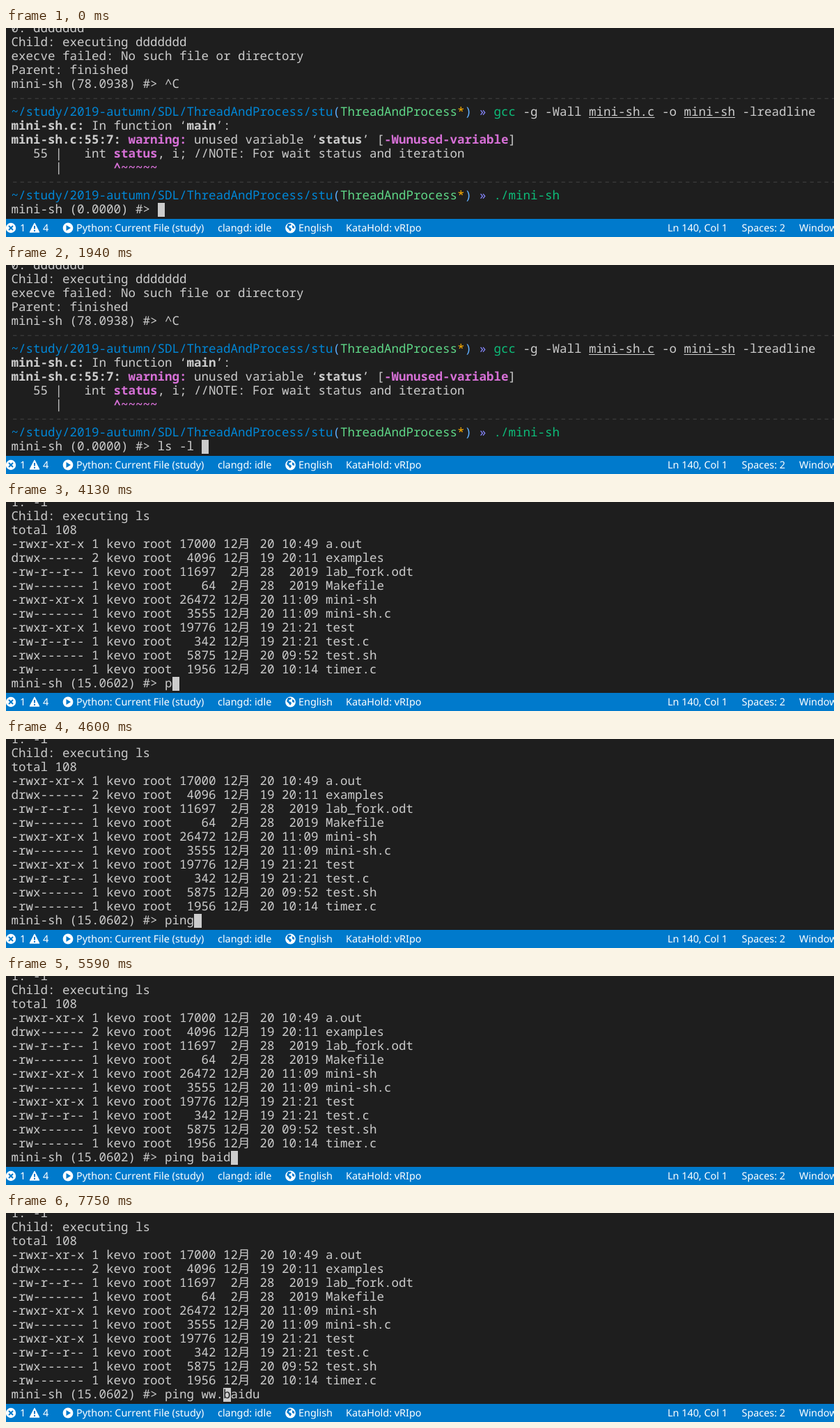
These frames come from a looping animation (1189x300 px, 8 s). An HTML page:

```html
<!DOCTYPE html>
<html lang="zh-CN">
<head>
<meta charset="utf-8">
<title>mini-sh</title>
<style>
  html, body { margin: 0; width: 100%; height: 100%; overflow: hidden; background: #1e1e1e; }
  body { position: relative; text-rendering: geometricPrecision; }
  pre, #cursor {
    position: absolute; margin: 0; white-space: pre;
    font: 17.5px/20px "Noto Sans Mono", "Noto Sans CJK SC", "Noto Sans CJK JP", monospace;
    font-variant-ligatures: none;
  }
  pre { left: 7.5px; top: -10px; color: #ccc; }
  #cursor { top: 251px; height: 20px; line-height: 18px; background: #ccc; color: #1e1e1e; overflow: hidden; }
  i { display: inline-block; width: 21px; font-style: normal; }
  u { text-underline-offset: 2px; text-decoration-thickness: 1px; }
  .rule { color: #3a3a3a; }
  .path { color: #0087d7; }
  .paren { color: #5fafff; }
  .branch { color: #5fd787; }
  .dirty { color: #ffaf00; }
  .arrow { color: #8787ff; }
  .cmd { color: #0dbc79; }
  .warn { color: #d670d6; font-weight: bold; }
  svg { position: absolute; left: 0; top: 0; }
  svg text { font: 14.4px "Noto Sans", sans-serif; fill: #fff; }
</style>
</head>
<body>
<pre id="screen"></pre>
<div id="cursor"></div>
<svg width="1189" height="300">
  <rect y="274" width="1189" height="26" fill="#007acc"/>
  <g fill="#fff" stroke="#007acc">
    <circle cx="7" cy="287" r="7.2" stroke="none"/>
    <path d="M4 284l6 6m0-6l-6 6" stroke-width="2"/>
    <path d="M41 280.5L47.5 293H34.5Z" stroke="#fff" stroke-width="1.5" stroke-linejoin="round"/>
    <path d="M41 284v4.5m0 1.5v2" stroke-width="2"/>
    <circle cx="89" cy="287" r="7.4" stroke="none"/>
    <path d="M86.5 283l6.5 4-6.5 4z" fill="#007acc" stroke="none"/>
    <circle cx="408.5" cy="287" r="7.4" stroke="none"/>
    <path d="M405 281l4 0 1 2-3 1-1 2 3 1 1 2-2 3-2-3-3-3zM411 283l3 2 0 3-3-1z" fill="#007acc" stroke="none"/>
  </g>
  <g id="labels"></g>
</svg>
<script>
const CELL = 10.5, LEFT = 8, LOOP = 8000;
const $ = id => document.getElementById(id);
const tag = (name, text) => `<span class="${name}">${text}</span>`;

const rule = tag('rule', '-'.repeat(113));
const prompt = tag('path', '~/study/2019-autumn/SDL/ThreadAndProcess/stu') + tag('paren', '(') +
  tag('branch', 'ThreadAndProcess') + tag('dirty', '*') + tag('paren', ')') + ' ' + tag('arrow', '»') + ' ';

const buildScreen = `0: ddddddd
Child: executing ddddddd
execve failed: No such file or directory
Parent: finished
mini-sh (78.0938) #&gt; ^C
${rule}
${prompt}${tag('cmd', 'gcc')} -g -Wall <u>mini-sh.c</u> -o <u>mini-sh</u> -lreadline
<b>mini-sh.c:</b> In function ‘<b>main</b>’:
<b>mini-sh.c:55:7:</b> ${tag('warn', 'warning:')} unused variable ‘<b>status</b>’ [${tag('warn', '-Wunused-variable')}]
   55 |   int ${tag('warn', 'status')}, i; //NOTE: For wait status and iteration
      |       ${tag('warn', '^~~~~~')}
${rule}
${prompt}${tag('cmd', './mini-sh')}
mini-sh (0.0000) #&gt; `;

// mode, links, size, month, day, time or year, name
const files = [
  ['-rwxr-xr-x', 1, 17000, 12, 20, '10:49', 'a.out'],
  ['drwx------', 2, 4096, 12, 19, '20:11', 'examples'],
  ['-rw-r--r--', 1, 11697, 2, 28, '2019', 'lab_fork.odt'],
  ['-rw-------', 1, 64, 2, 28, '2019', 'Makefile'],
  ['-rwxr-xr-x', 1, 26472, 12, 20, '11:09', 'mini-sh'],
  ['-rw-------', 1, 3555, 12, 20, '11:09', 'mini-sh.c'],
  ['-rwxr-xr-x', 1, 19776, 12, 19, '21:21', 'test'],
  ['-rw-r--r--', 1, 342, 12, 19, '21:21', 'test.c'],
  ['-rwx------', 1, 5875, 12, 20, '09:52', 'test.sh'],
  ['-rw-------', 1, 1956, 12, 20, '10:14', 'timer.c'],
];
const pad = (value, width) => String(value).padStart(width);
const listing = files.map(([mode, links, size, month, day, time, name]) =>
  `${mode} ${links} kevo root ${pad(size, 5)} ${pad(month, 2)}<i>月</i> ${day} ${pad(time, 5)} ${name}`);
const listScreen = ['1: -l', 'Child: executing ls', 'total 108', ...listing, 'mini-sh (15.0602) #&gt; '].join('\n');

// "_" marks the cursor position in the typed line
const first = { html: buildScreen, col: 20 }, second = { html: listScreen, col: 21 };
const steps = [
  [0, first, '_'], [490, first, 'l_'], [590, first, 'ls_'], [830, first, 'ls _'],
  [1080, first, 'ls -_'], [1690, first, 'ls -l_'], [1940, first, 'ls -l _'],
  [2250, second, '_'], [4130, second, 'p_'], [4390, second, 'pi_'], [4490, second, 'pin_'],
  [4600, second, 'ping_'], [4850, second, 'ping _'], [5110, second, 'ping b_'],
  [5210, second, 'ping ba_'], [5410, second, 'ping bai_'], [5590, second, 'ping baid_'],
  [5700, second, 'ping baidu_'], [6650, second, 'ping _baidu'], [7290, second, 'ping w_baidu'],
  [7470, second, 'ping ww_baidu'], [7750, second, 'ping ww._baidu'],
];

const labels = [
  [20, '1'], [53, '4'], [101, 'Python: Current File (study)'], [304, 'clangd: idle'], [420, 'English'],
  [488, 'KataHold: vRIpo'], [950, 'Ln 140, Col 1'], [1056.5, 'Spaces: 2'], [1139, 'Window'],
];
$('labels').innerHTML = labels.map(([x, text]) => `<text x="${x}" y="292">${text}</text>`).join('');

let shown;
function draw(now) {
  const t = now % LOOP;
  const step = steps.findLast(([start]) => start <= t);
  if (step !== shown) {
    shown = step;
    const [, screen, typed] = step;
    const [before, after] = typed.split('_');
    $('screen').innerHTML = screen.html + before + after;
    const x = LEFT + (screen.col + before.length) * CELL;
    const left = Math.floor(x);
    const cursor = $('cursor');
    cursor.style.left = left + 'px';
    cursor.style.width = Math.floor(x + CELL) - left + 'px';
    cursor.textContent = after.slice(0, 1);
  }
  requestAnimationFrame(draw);
}
draw(0);
</script>
</body>
</html>
```
